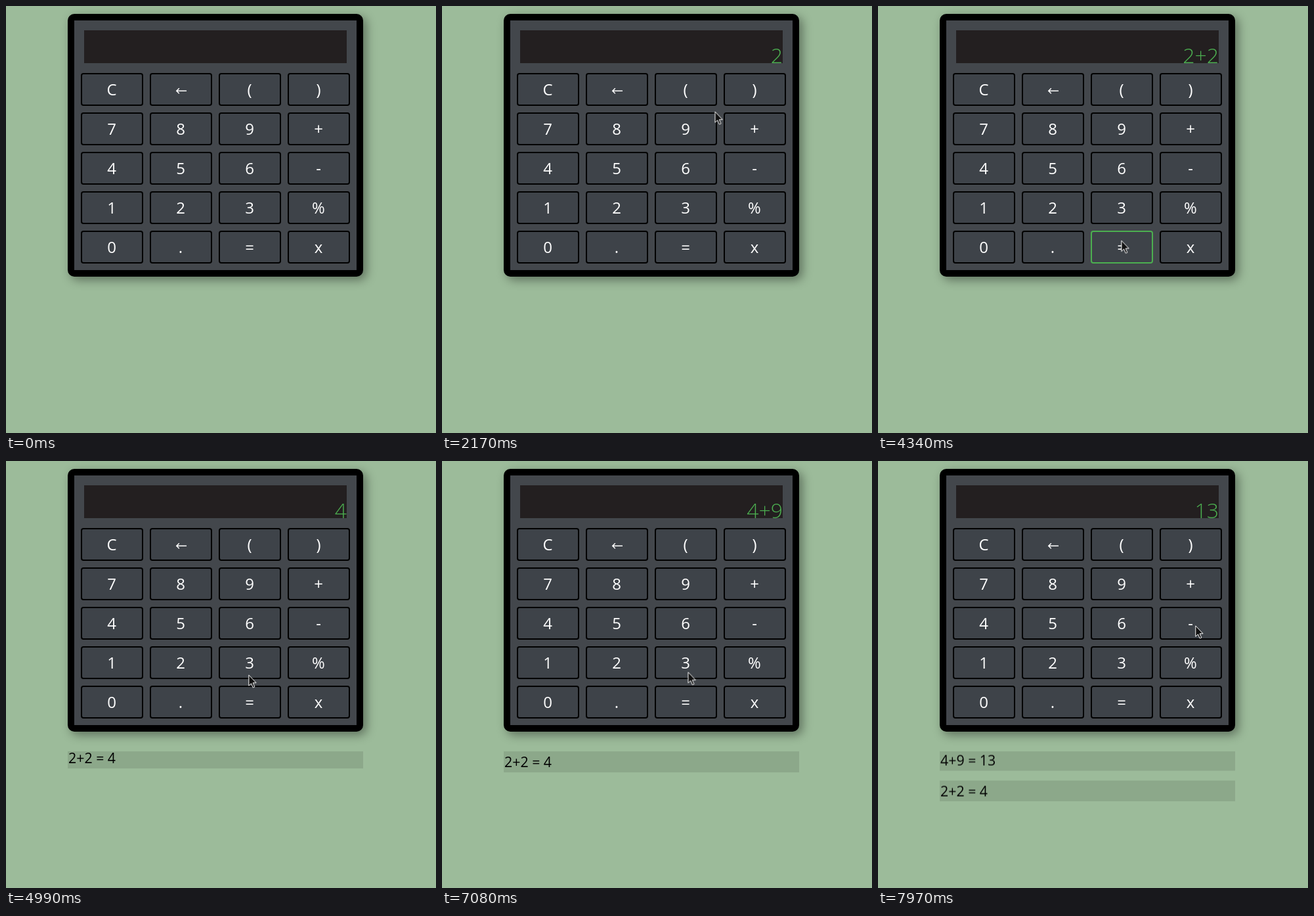
An HTML page that plays this animation: 655x650 px, repeating every 8 s.

```html
<!DOCTYPE html>
<html lang="en">
<head>
<meta charset="utf-8">
<title>Calculator</title>
<style>
  :root { --green: #4caf50; --loop: 8s; }
  html, body { margin: 0; width: 100%; height: 100%; overflow: hidden; }
  body {
    position: relative;
    background: #9cbb9a;
    font-family: "Open Sans", "Noto Sans", sans-serif;
  }

  .calc {
    position: absolute; left: 94px; top: 12px;
    box-sizing: border-box; width: 450px; height: 400px;
    border: 10px solid #000; border-radius: 10px;
    background: #43474c;
    box-shadow: 5px 5px 15px rgba(0, 0, 0, .4);
  }
  .screen {
    position: absolute; left: 15px; top: 15px;
    width: 400px; height: 50px;
    background: #231f20;
  }
  .value {
    position: absolute; right: 0; top: 16px;
    width: 100%; height: 44px; overflow: hidden;
    font-size: 32px; font-weight: 300; line-height: 44px;
    text-align: right; color: var(--green);
  }
  .value div { height: 44px; }
  .strip { animation: value var(--loop) step-end infinite; }

  .keys {
    position: absolute; left: 10px; top: 80px;
    display: grid; gap: 10px;
    grid-template-columns: repeat(4, 95px);
    grid-auto-rows: 50px;
  }
  .keys span {
    box-sizing: border-box;
    border: 2px solid #000; border-radius: 4px;
    background: #3e4349; color: #fff;
    font-size: 24px; line-height: 46px; text-align: center;
    text-indent: -1px;
  }
  .keys svg { display: block; margin: 0 auto; }
  .plus  { animation: plus  var(--loop) step-end infinite; }
  .two   { animation: two   var(--loop) step-end infinite; }
  .nine  { animation: nine  var(--loop) step-end infinite; }
  .equal { animation: equal var(--loop) step-end infinite; }

  .history {
    position: absolute; left: 94px; top: 442px;
    width: 450px; height: 208px; overflow: hidden;
    font-size: 21.333px; line-height: 30px; color: #000;
  }
  .history p {
    margin: 0 0 15px; padding: 1px; height: 30px;
    background: rgba(0, 0, 0, .1);
  }
  .list { animation: slide var(--loop) linear infinite; }

  .cursor {
    position: absolute; left: 0; top: 0;
    width: 14px; height: 22px;
    animation: move var(--loop) linear infinite;
  }

  @keyframes value {
    0%      { transform: none; }
    23%     { transform: translateY(-44px); }
    34.125% { transform: translateY(-88px); }
    44.5%   { transform: translateY(-132px); }
    55.125% { transform: translateY(-176px); }
    81.125% { transform: translateY(-220px); }
    86.375% { transform: translateY(-264px); }
    90.75%, 100% { transform: translateY(-308px); }
  }

  @keyframes plus {
    0%, 34.125%, 81.125%, 100% { border-color: #000; }
    33.125%, 80.125% { border-color: var(--green); }
  }
  @keyframes two {
    0%, 44.5%, 100% { border-color: #000; }
    43.5% { border-color: var(--green); }
  }
  @keyframes nine {
    0%, 86.375%, 100% { border-color: #000; }
    85.375% { border-color: var(--green); }
  }
  @keyframes equal {
    0%, 55.125%, 90.75%, 100% { border-color: #000; }
    54.25%, 89.75% { border-color: var(--green); }
  }

  /* Each entry eases in over 1s; the loop cuts the second at 74%, so its curve is the first part of ease. */
  @keyframes slide {
    0%      { transform: translateY(-94px); }
    55.125% { transform: translateY(-94px); animation-timing-function: ease; }
    67.625% { transform: translateY(-47px); }
    90.75%  { transform: translateY(-47px); animation-timing-function: cubic-bezier(.293, .091, .332, .811); }
    100%    { transform: translateY(-2px); }
  }

  @keyframes move {
    0%, 3.37%        { transform: translate(117px, 41px); opacity: 0; }
    3.375%           { transform: translate(117px, 41px); opacity: 1; }
    4.375%, 6.625%   { transform: translate(452px, 94px); }
    8.5%             { transform: translate(251px, 338px); }
    9.625%, 13.75%   { transform: translate(271px, 308px); }
    15.25%, 23%      { transform: translate(272px, 304px); }
    23.5%            { transform: translate(273px, 312px); }
    27.125%          { transform: translate(415px, 160px); }
    29.125%          { transform: translate(455px, 180px); }
    32.625%, 34.625% { transform: translate(461px, 186px); }
    40%              { transform: translate(251px, 308px); }
    42%, 45%         { transform: translate(259px, 304px); }
    51.25%           { transform: translate(368px, 357px); }
    55.625%          { transform: translate(371px, 356px); }
    62.375%          { transform: translate(369px, 325px); }
    63.875%          { transform: translate(375px, 310px); }
    66.625%          { transform: translate(512px, 110px); }
    68.875%, 73.125% { transform: translate(374px, 167px); }
    73.875%, 81.125% { transform: translate(461px, 189px); }
    83.625%, 86.375% { transform: translate(382px, 190px); }
    89.125%, 90.75%  { transform: translate(372px, 358px); }
    94.125%          { transform: translate(441px, 332px); }
    95.125%          { transform: translate(455px, 310px); }
    98.125%          { transform: translate(486px, 243px); }
    99.625%, 100%    { transform: translate(483px, 250px); opacity: 1; }
  }
</style>
</head>
<body>
  <div class="calc">
    <div class="screen">
      <div class="value">
        <div class="strip">
          <div></div><div>2</div><div>2+</div><div>2+2</div>
          <div>4</div><div>4+</div><div>4+9</div><div>13</div>
        </div>
      </div>
    </div>
    <div class="keys">
      <span>C</span>
      <span><svg width="18" height="46" fill="none" stroke="#fff" stroke-width="1.5" aria-label="←"><path d="M17 25.2H2M5.8 21.2L1.8 25.2l4 4"/></svg></span>
      <span>(</span><span>)</span>
      <span>7</span><span>8</span><span class="nine">9</span><span class="plus">+</span>
      <span>4</span><span>5</span><span>6</span><span>-</span>
      <span>1</span><span class="two">2</span><span>3</span><span>%</span>
      <span>0</span><span>.</span><span class="equal">=</span><span>x</span>
    </div>
  </div>

  <div class="history">
    <div class="list">
      <p>4+9 = 13</p>
      <p>2+2 = 4</p>
    </div>
  </div>

  <svg class="cursor" viewBox="0 0 14 22">
    <path d="M.8 .9V17.2l3.7-3.4 2.7 6.2 2.6-1.1-2.7-6.1h5z" fill="#111" stroke="#fff"/>
  </svg>
</body>
</html>
```
